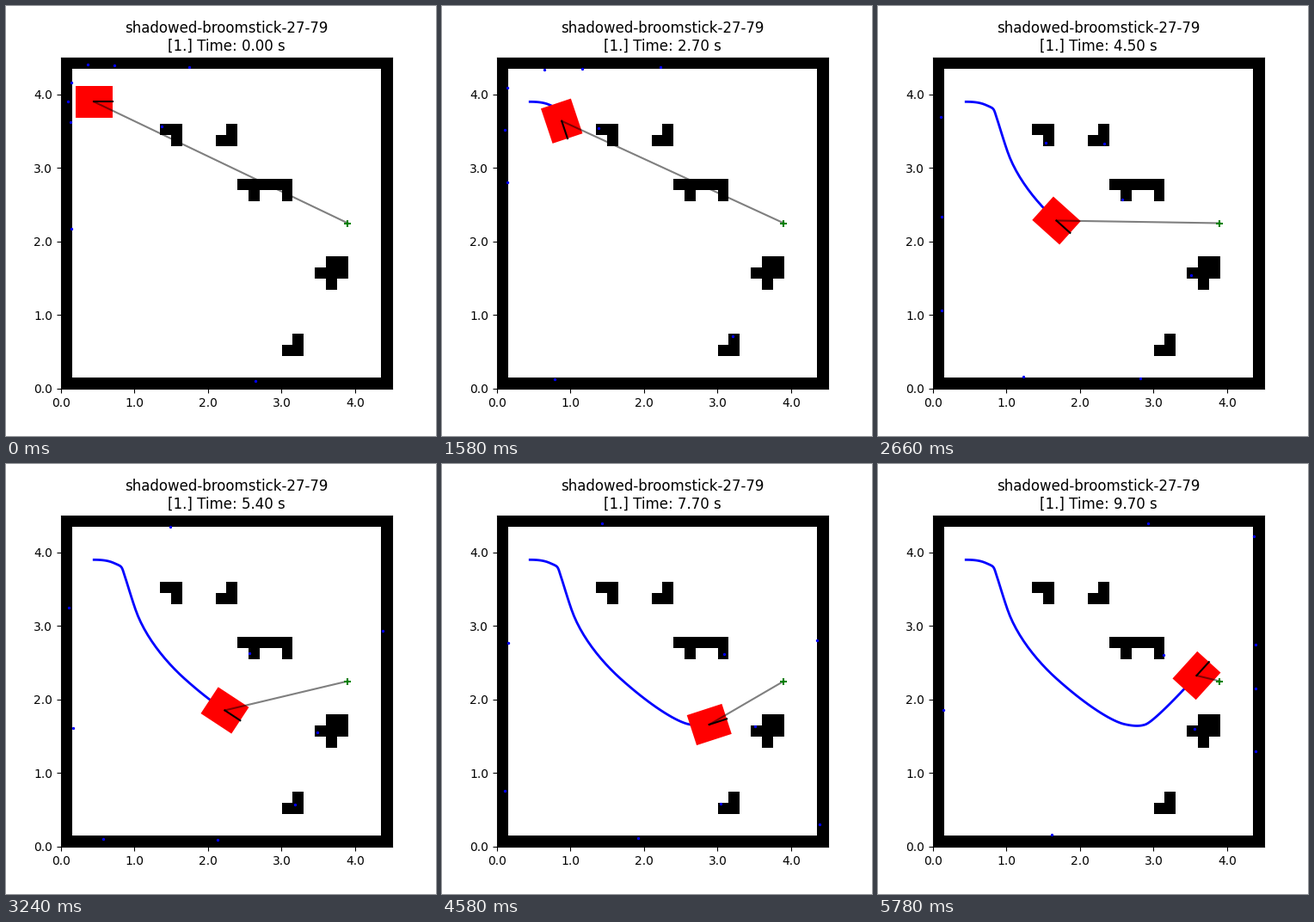
Recreate the animation shown at these times as a matplotlib script. Size 500x500 px, loop 5800 ms.

```python
import numpy as np
import matplotlib.pyplot as plt
from matplotlib.animation import FuncAnimation
from matplotlib.patches import Rectangle

CELL, N = 0.15, 30
SIZE = CELL * N
GOAL = (3.9, 2.25)
STEPS = 98
TICK = 20   # ms; each pair of steps takes 20 + 100 ms
TICKS = 290
LENGTH, WIDTH = 0.5, 0.43

# time, x, y, heading in degrees, speed
POSES = np.array([
    (0.0, 0.450, 3.900, 0, 0.30),
    (1.0, 0.718, 3.857, -24, 0.25),
    (2.7, 0.882, 3.638, -71.5, 0.35),
    (3.3, 1.014, 3.226, -71, 0.95),
    (4.5, 1.680, 2.285, -42, 0.90),
    (6.3, 2.609, 1.664, -12.2, 0.30),
    (7.7, 2.887, 1.660, 18, 0.15),
    (9.7, 3.585, 2.326, 47.7, 0.65),
])


def build_grid():
    """Walls plus obstacles made of 2x2 blocks with one left cell missing."""
    grid = np.zeros((N, N))
    grid[[0, -1], :] = grid[:, [0, -1]] = 1

    def hook(col, row, top):
        grid[row:row + 2, col + 1] = 1
        grid[row + top, col] = 1

    for col, row in [(9, 22), (16, 17), (19, 17), (24, 10), (23, 9)]:
        hook(col, row, top=1)
    for col, row in [(14, 22), (20, 3)]:
        hook(col, row, top=0)
    grid[18, 18] = 1
    return grid


def drive(t):
    """Cubic Hermite path through the poses; the robot faces along it."""
    kt, pos, rad = POSES[:, 0], POSES[:, 1:3], np.radians(POSES[:, 3])
    vel = POSES[:, 4:] * np.column_stack([np.cos(rad), np.sin(rad)])
    i = np.clip(np.searchsorted(kt, t, side="right") - 1, 0, len(kt) - 2)
    dt = (kt[i + 1] - kt[i])[:, None]
    u = (t - kt[i])[:, None] / dt
    p, step = pos[i], pos[i + 1] - pos[i]
    a, b = dt * vel[i], dt * vel[i + 1]
    c2, c3 = 3 * step - 2 * a - b, a + b - 2 * step
    xy = p + u * (a + u * (c2 + u * c3))
    dx, dy = (a + u * (2 * c2 + 3 * u * c3)).T
    return xy, np.arctan2(dy, dx)


def scan(grid, pos, heading, rng):
    """Nine noisy range readings, 40 degrees apart."""
    a = heading + np.radians(20 + 40 * np.arange(9))
    ray = np.column_stack([np.cos(a), np.sin(a)])
    r = np.arange(0, 6.4, 0.005)
    cells = (pos + ray[:, None, :] * r[None, :, None]) / CELL
    c = np.clip(cells.astype(int), 0, N - 1)
    hit = r[(grid[c[..., 1], c[..., 0]] > 0).argmax(axis=1)]
    hit = hit + rng.normal(0.03, 0.02, 9)
    return pos + ray * hit[:, None]


grid = build_grid()
times = np.arange(STEPS) * 0.1
path, heading = drive(times)
rng = np.random.default_rng(27)
scans = [scan(grid, p, h, rng) for p, h in zip(path, heading)]

fig, ax = plt.subplots(figsize=(5, 5), dpi=100)
ax.imshow(grid, cmap="binary", origin="lower", extent=(0, SIZE, 0, SIZE),
          interpolation="nearest")
marks = range(5)
labels = [f"{m:.1f}" for m in marks]
ax.set_xticks(marks, labels)
ax.set_yticks(marks, labels)
title = ax.set_title("")

trail, = ax.plot([], [], color="blue", lw=2, zorder=2)
body = Rectangle((0, 0), LENGTH, WIDTH, rotation_point="center",
                 facecolor="red", edgecolor="none", zorder=3)
ax.add_patch(body)
sight, = ax.plot([], [], color="black", alpha=0.5, lw=1.5, zorder=4)
nose, = ax.plot([], [], color="black", lw=1.5, zorder=5)
hits, = ax.plot([], [], "o", color="blue", ms=2.4, mew=0, zorder=6)
ax.scatter(*GOAL, marker="+", s=36, color="green", zorder=4)
ax.set(xlim=(0, SIZE), ylim=(0, SIZE))


def update(tick):
    k = 2 * (tick // 6) + (tick % 6 > 0)
    (x, y), a = path[k], heading[k]
    title.set_text(f"shadowed-broomstick-27-79\n[1.] Time: {times[k]:.2f} s")
    trail.set_data(path[:k + 1].T)
    body.set_xy((x - LENGTH / 2, y - WIDTH / 2))
    body.set_angle(np.degrees(a))
    sight.set_data([x, GOAL[0]], [y, GOAL[1]])
    nose.set_data([x, x + LENGTH / 2 * np.cos(a)], [y, y + LENGTH / 2 * np.sin(a)])
    hits.set_data(scans[k].T)
    return title, trail, body, sight, nose, hits


anim = FuncAnimation(fig, update, frames=TICKS, interval=TICK,
                     repeat=True, repeat_delay=0)
plt.show()
```
